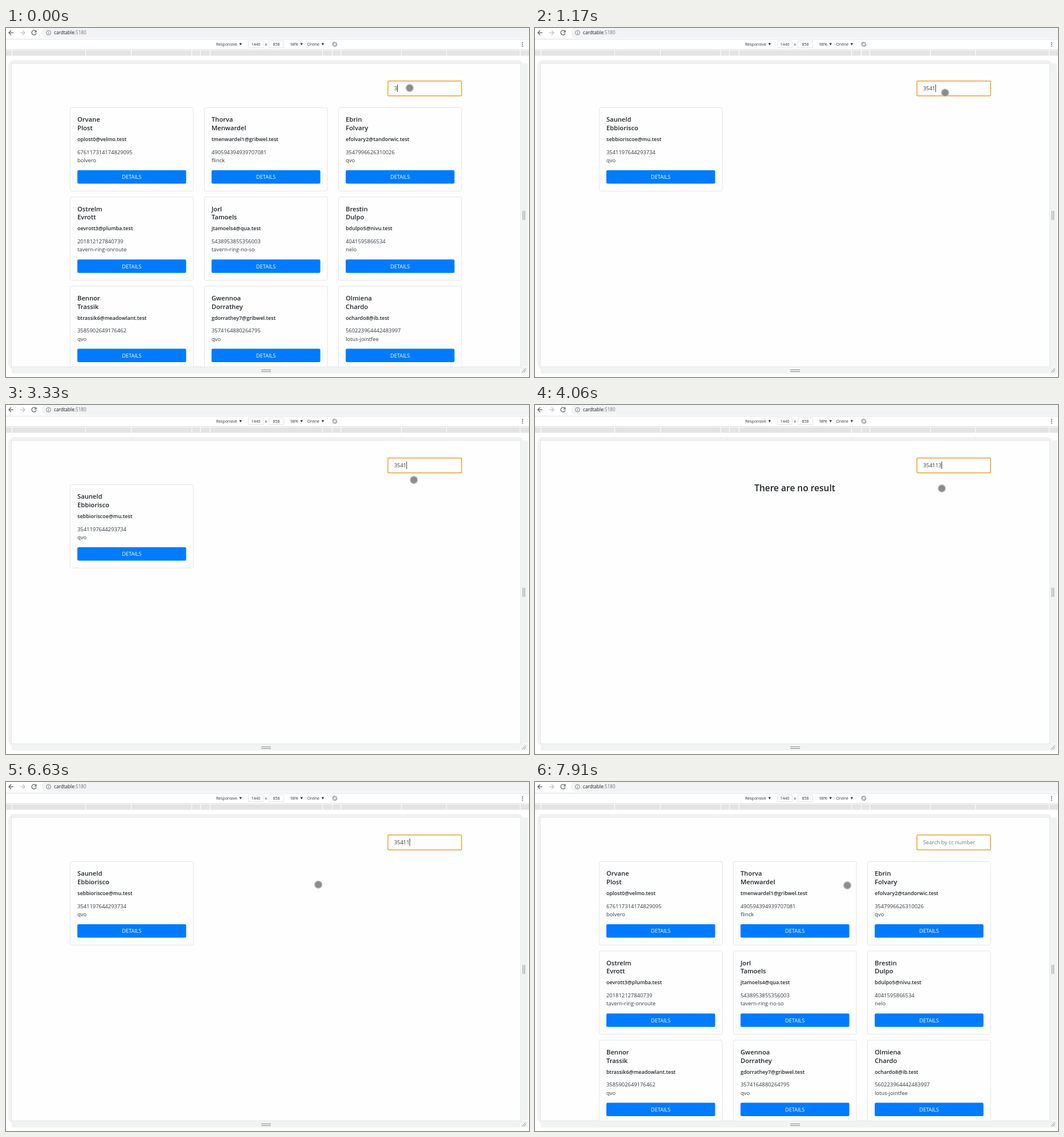
These frames come from a looping animation (916x611 px, 8000 ms). An HTML page:

```html
<!DOCTYPE html>
<html lang="en">
<head>
<meta charset="utf-8">
<title>Card search</title>
<style>
  html, body { margin: 0; width: 100%; height: 100%; overflow: hidden; background: #fff; }
  svg { display: block; }
  text { font: 9.4px "Open Sans", "Noto Sans", sans-serif; fill: #212529; white-space: pre; }
  .tool text { font-size: 7px; fill: #333; }
  .tool .mid, .btn, .none { text-anchor: middle; }
  .tool .arrow { fill: #333; }
  .tool .url { font-size: 8.2px; fill: #202124; }
  .line { fill: none; stroke: #5f6368; stroke-width: 1.3; }
  .thin { stroke-width: .8; }
  .grip { fill: none; stroke: #8a8a8a; stroke-width: 1; }
  .field { fill: #fff; stroke: #e3a432; stroke-width: 1.5; }
  .card { fill: #fefefe; stroke: #dfdfdf; stroke-width: .8; }
  .name { font-size: 11.2px; font-weight: 600; }
  .mail { font-size: 9px; font-weight: 600; }
  .info { fill: #343a40; }
  .btn { font-size: 9.2px; font-weight: 500; fill: #fff; }
  .none { font-size: 15.5px; font-weight: 600; }
</style>
</head>
<body>
<svg width="916" height="611" viewBox="0 0 916 611">
  <defs>
    <clipPath id="view"><rect x="10" y="62" width="891" height="530.5"/></clipPath>
  </defs>

  <g class="tool">
    <path d="M930 -1H72a9 9 0 0 0 0 18.500H930z" fill="#f1f3f4"/>
    <path class="line" d="M13 8.300H5.200M9 4.300L5 8.300L9 12.300"/>
    <path class="line" style="stroke:#bdc1c6" d="M25 8.300H32.800M29 4.300L33 8.300L29 12.300"/>
    <path class="line" d="M52.300 5.700A4 4 0 1 0 53 9.300M53 4V7.200H49.800"/>
    <circle class="line thin" cx="74.500" cy="8.300" r="3.900"/>
    <path class="line thin" d="M74.500 7.700V10.600M74.500 5.900V6.900"/>
    <text class="url" x="84" y="11.300">cardtable<tspan fill="#70757a">:5180</tspan></text>

    <path d="M0 19.500H916M0 37.500H916" stroke="#dedede"/>
    <text x="368" y="31.200">Responsive</text>
    <text x="498" y="31.200">98%</text>
    <text x="527.500" y="31.200">Online</text>
    <path class="arrow" d="M408.500 26.500h4.600l-2.300 4zM515.300 26.500h4.600l-2.300 4zM552.500 26.500h4.600l-2.300 4z"/>
    <path d="M424.500 22.500h26v12h-26zM460.500 22.500h26v12h-26z" fill="none" stroke="#e4e4e4"/>
    <text class="mid" x="437.500" y="31.200">1440</text>
    <text class="mid" x="455.300" y="31.200">x</text>
    <text class="mid" x="473.500" y="31.200">858</text>
    <circle class="line thin" cx="575.800" cy="28.500" r="3.800"/>
    <rect class="line thin" x="574.300" y="25.500" width="3" height="6" transform="rotate(-45 575.8 28.5)"/>
    <path d="M903.800 24.700h1.700v1.700h-1.700zM903.800 27.800h1.700v1.700h-1.700zM903.800 30.900h1.700v1.700h-1.700z" fill="#555"/>
    <g id="ruler" fill="#e4e4e4"></g>
  </g>

  <rect x="4" y="56" width="903" height="542" rx="11" fill="#f2f2f2"/>
  <path d="M902 62H914V592H902zM10 593H901V605H10zM902 593H914V605H902z" fill="#f1f2f2"/>
  <rect x="9.500" y="62" width="892" height="531" fill="#fefefe" stroke="#e6e6e6"/>
  <path class="grip" d="M905.500 320V336M908.500 320V336M447 598.500H464M447 601.500H464M903.500 603L910.500 596M907 603L910.500 599.500"/>

  <rect class="field" x="668.900" y="92.800" width="129" height="25.900" rx="1.500"/>
  <text id="query" x="679.700" y="109.200"></text>
  <path id="caret" stroke="#222" stroke-width=".9"/>
  <g id="cards" clip-path="url(#view)"></g>
  <circle id="pointer" r="6.500" fill="#8c8c8c" stroke="#c6c6c6" stroke-width="1.400"/>
</svg>

<script>
const $ = id => document.getElementById(id);
const LOOP = 8000, BLINK = 550, DIGIT = 5.38;

// first name, last name, mail, card number, card type
const people = `
Orvane,Plost,oplost0@velmo.test,676117314174829095,bolvero
Thorva,Menwardel,tmenwardel1@gribwel.test,490594394939707081,flinck
Ebrin,Folvary,efolvary2@tandorwic.test,3547996626310026,qvo
Ostrelm,Evrott,oevrott3@plumba.test,201812127840739,tavern-ring-onroute
Jorl,Tamoels,jtamoels4@qua.test,5438953855356003,tavern-ring-no-so
Brestin,Dulpo,bdulpo5@nivu.test,4041595866534,nelo
Bennor,Trassik,btrassik6@meadowlant.test,3585902649176462,qvo
Gwennoa,Dorrathey,gdorrathey7@gribwel.test,3574164880264795,qvo
Olmiena,Chardo,ochardo8@ib.test,560223964442483997,lotus-jointfee
Polynva,Tarrigher,ptarrigherd@lo.test,3545746857064897,qvo
Sauneld,Ebbiorisco,sebbioriscoe@mu.test,3541197644293734,qvo
Tilvor,Hansleck,thansleckf@orbu.test,3587120946617208,qvo
Mirzel,Coddrane,mcoddraneg@velmo.test,3569028174460917,qvo
Fennick,Ulbarro,fulbarroh@plumba.test,3578861402297160,qvo
`.trim().split("\n").map(row => row.split(","));

// time, text in the search field
const typing = [
  [0, "3"], [150, "35"], [430, "354"], [1040, "3541"], [3620, "35411"], [4060, "354113"],
  [6190, "35411"], [6910, "3541"], [7360, "354"], [7490, "35"], [7760, "3"], [7910, ""]
];

// time, pointer x, pointer y
const path = [
  [0, 707, 105], [150, 707, 105], [430, 720.5, 112], [1040, 720.5, 112], [1450, 713.5, 116],
  [2460, 713.5, 116], [2740, 715, 126], [3180, 715, 126], [3760, 712.5, 146], [4550, 712.5, 146],
  [4900, 610, 160], [5190, 520, 172], [5330, 495, 171], [5620, 544, 169], [5800, 544, 169],
  [6490, 547, 179], [6910, 547, 181], [LOOP, 547, 181]
];

const label = (cls, x, y, s) => `<text class="${cls}" x="${x}" y="${y}">${s}</text>`;

function card([first, last, mail, number, type], i) {
  const x = 112.4 + i % 3 * 235, y = 139.4 + Math.floor(i / 3) * 156.3;
  return `<g transform="translate(${x} ${y})">
    <rect class="card" width="215.600" height="146" rx="2.500"/>
    ${label("name", 12.6, 25, first)}${label("name", 12.6, 39.600, last)}
    ${label("mail", 12.6, 58.500, mail)}
    ${label("info", 12.6, 81.200, number)}${label("info", 12.6, 95.700, type)}
    <rect x="12.600" y="109.600" width="190.500" height="23.500" rx="2.300" fill="#007bff"/>
    ${label("btn", 107.8, 124.900, "DETAILS")}</g>`;
}

function search(text) {
  const found = people.filter(p => p[3].includes(text)).slice(0, 9);
  $("cards").innerHTML = found.map(card).join("") || label("none", 455, 151.2, "There are no result");
  $("query").textContent = text || "Search by cc number";
  $("query").style.fill = text ? "#343a40" : "#6c757d";
  const x = 680.2 + text.length * DIGIT;
  $("caret").setAttribute("d", `M${x} 99V112`);
}

function pointerAt(t) {
  const i = path.findIndex(p => p[0] > t);
  const [t0, x0, y0] = path[i - 1], [t1, x1, y1] = path[i];
  const k = (t - t0) / (t1 - t0);
  return [x0 + (x1 - x0) * k, y0 + (y1 - y0) * k];
}

const marks = [-1, 10, 139, 219, 325, 340, 357, 554, 571, 586, 692, 771, 900, 917];
$("ruler").innerHTML = marks.slice(1).map((end, i) =>
  `<rect x="${marks[i] + 1}" y="39" width="${end - marks[i] - 1}" height="9.500"/>`).join("");

let shown = null;
function draw(now) {
  const t = now % LOOP;
  const [since, text] = typing.filter(s => s[0] <= t).pop();
  if (text !== shown) search(shown = text);
  const lit = text && Math.floor((t - since) / BLINK) % 2 === 0;
  $("caret").setAttribute("visibility", lit ? "visible" : "hidden");
  const [x, y] = pointerAt(t);
  $("pointer").setAttribute("cx", x);
  $("pointer").setAttribute("cy", y);
}

const start = performance.now();
function tick() {
  draw(performance.now() - start);
  requestAnimationFrame(tick);
}
tick();
</script>
</body>
</html>
```
